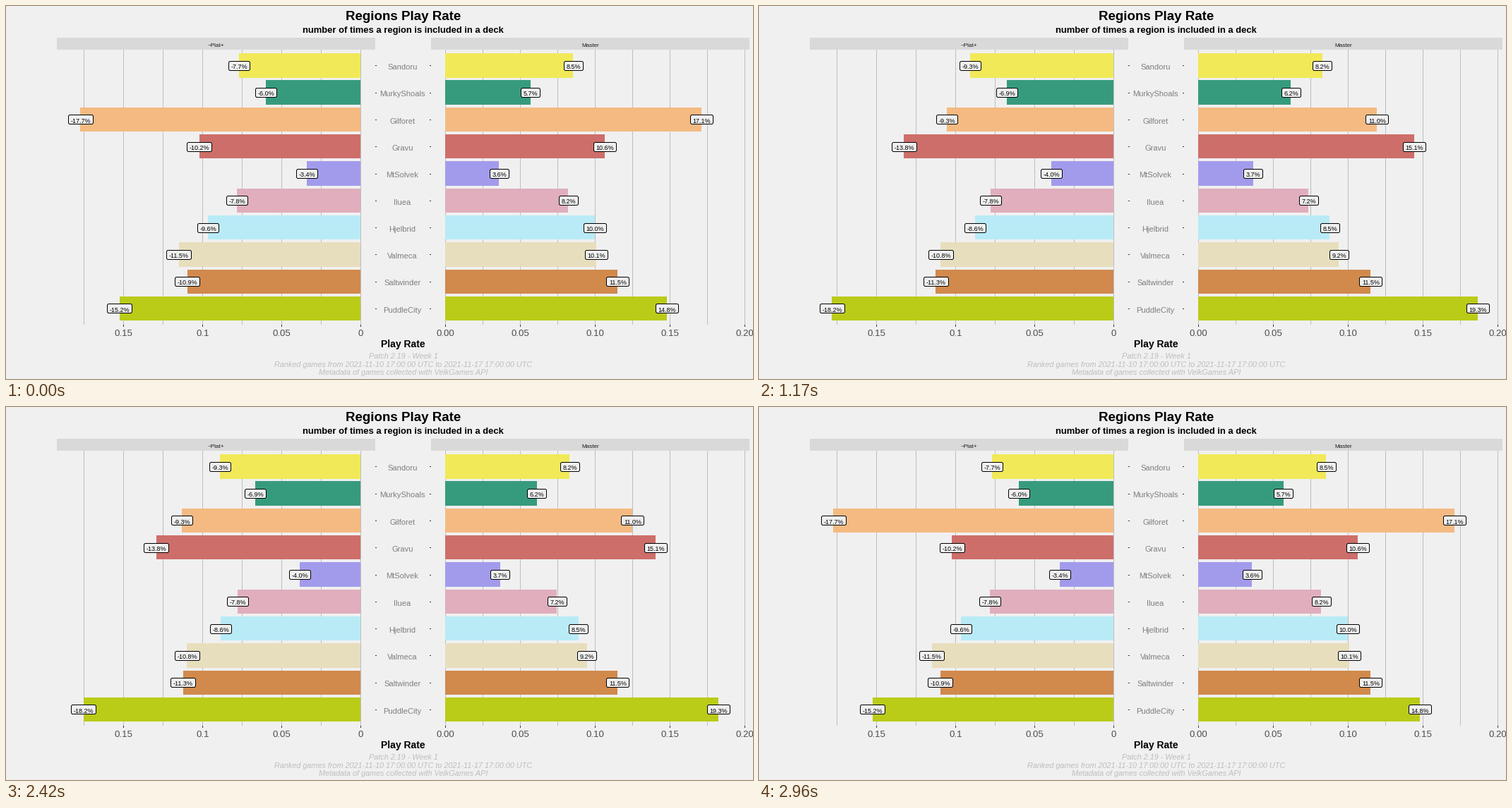
Write a matplotlib script that moves like this. It is 1058 px wide and 529 px high and loops after 3000 ms.

```python
import matplotlib.pyplot as plt
from matplotlib.animation import FuncAnimation
from matplotlib.patches import FancyBboxPatch, Rectangle

W, H, DPI = 1058, 529, 100
FRAMES, LOOP_MS = 72, 3000
BG = "#F0F0F0"
LABEL_PX = 9

# name, colour, (left start, left end), (right start, right end)
REGIONS = [
    ("Sandoru", "#F1E957", (.0767, .0928), (.0853, .0822)),
    ("MurkyShoals", "#369B7D", (.0596, .0689), (.0566, .0624)),
    ("Gilforet", "#F5BA82", (.1772, .0928), (.1708, .1100)),
    ("Gravu", "#CD6E6A", (.1020, .1377), (.1063, .1508)),
    ("MtSolvek", "#A29BEC", (.0338, .0401), (.0358, .0366)),
    ("Iluea", "#E0AEBD", (.0781, .0776), (.0820, .0719)),
    ("Hjelbrid", "#B8EBF6", (.0964, .0861), (.0999, .0853)),
    ("Valmeca", "#E7DEBD", (.1149, .1082), (.1008, .0924)),
    ("Saltwinder", "#D1894C", (.1094, .1129), (.1147, .1147)),
    ("PuddleCity", "#BACB18", (.1524, .1824), (.1480, .1932)),
]
# sign, x of zero, pixels per unit
SIDES = [(-1, 502, 2240), (1, 622.5, 2121)]

plt.rcParams["font.family"] = "Liberation Sans"
fig = plt.figure(figsize=(W / DPI, H / DPI), dpi=DPI, facecolor=BG)
ax = fig.add_axes([0, 0, 1, 1])
ax.set(xlim=(0, W), ylim=(H, 0))
ax.axis("off")


def text(x, baseline, s, px, color="black", **kw):
    return ax.text(x, baseline, s, fontsize=px * 72 / DPI, color=color,
                   ha="center", va="baseline", **kw)


def rect(x, y, w, h, color, z=1):
    patch = Rectangle((x, y), w, h, facecolor=color, linewidth=0,
                      antialiased=False, zorder=z)
    return ax.add_patch(patch)


def row_center(i):
    return 84.3 + 38.3 * i


def label_width(s):
    em = {"-": .333, ".": .278, "%": .889}
    return round(LABEL_PX * sum(em.get(c, .556) for c in s) + 6)


def draw_static():
    text(562.5, 20.5, "Regions Play Rate", 18.8, weight="bold")
    text(562.5, 38, "number of times a region is included in a deck", 13,
         weight="bold")
    for x, title in ((72, "~Plat+"), (602, "Master")):
        rect(x, 45, 451, 17, "#D9D9D9")
        text(x + 225.5, 57.5, title, 8.2, "#1A1A1A")

    for (sign, zero, scale), count in zip(SIDES, (8, 9)):
        for k in range(count):
            x = int(zero + sign * scale * .025 * k)
            rect(x, 62, 1, 390, "#BEBEBE")
            if k % 2 == 0:
                rect(x, 452, 1, 3, "#333333")
                value = .025 * k
                tick = f"{value:.2f}" if sign > 0 else f"{value:.2g}"
                text(x + .5, 468, tick, 13.2, "#4D4D4D")

    for i, (name, *_) in enumerate(REGIONS):
        y = row_center(i)
        text(561.5, y + 5.7, name, 11.1, "#7F7F7F")
        for x in (523, 600):
            rect(x, int(y + .5), 2, 1, "#333333")

    text(562.5, 484, "Play Rate", 14, weight="bold")
    caption = (
        "Patch 2.19 - Week 1",
        "Ranked games from 2021-11-10 17:00:00 UTC to 2021-11-17 17:00:00 UTC",
        "Metadata of games collected with VelkGames API",
    )
    for i, line in enumerate(caption):
        text(562.5, 500 + 11.5 * i, line, 10.85, "#BEBEBE", style="italic")


class Bar:
    def __init__(self, row, side, color, rates):
        self.sign, self.zero, self.scale = side
        self.rates = rates
        y = row_center(row)
        top, bottom = round(y - 17.2), round(y + 17.2)
        self.bar = rect(0, top, 1, bottom - top, color, 2)
        self.box_y = round(y - 6.5) + .5
        self.box = ax.add_patch(FancyBboxPatch(
            (0, self.box_y), 30, 13, boxstyle="round,pad=0,rounding_size=2.2",
            facecolor=BG, edgecolor="black", linewidth=72 / DPI, zorder=3))
        self.label = text(0, y + 4.7, "", LABEL_PX, zorder=4)

    def update(self, p):
        start, end = self.rates
        rate = start + (end - start) * p
        shown = end if p >= .5 else start
        tip = self.zero + self.sign * self.scale * rate
        base = int(self.zero)
        self.bar.set_x(base)
        self.bar.set_width(round(tip) - base)
        s = f"{self.sign * shown * 100:.1f}%"
        w = label_width(s)
        self.box.set_bounds(round(tip - w / 2) + .5, self.box_y, w, 13)
        self.label.set_text(s)
        self.label.set_x(round(tip - w / 2) + .5 + w / 2)


def cubic_in_out(t):
    return 4 * t ** 3 if t < .5 else 1 - 4 * (1 - t) ** 3


def progress(frame):
    """Hold, move to the second state, hold, move back."""
    if frame < 12:
        return 0
    if frame < 36:
        return cubic_in_out((frame - 12) / 24)
    if frame < 49:
        return 1
    return 1 - cubic_in_out((frame - 49) / 23)


draw_static()
bars = [Bar(i, side, color, rates)
        for i, (_, color, *both) in enumerate(REGIONS)
        for side, rates in zip(SIDES, both)]


def update(frame):
    p = progress(frame)
    for bar in bars:
        bar.update(p)
    return []


anim = FuncAnimation(fig, update, frames=FRAMES, interval=LOOP_MS / FRAMES,
                     init_func=lambda: update(0), repeat=True, repeat_delay=0)
plt.show()
```
